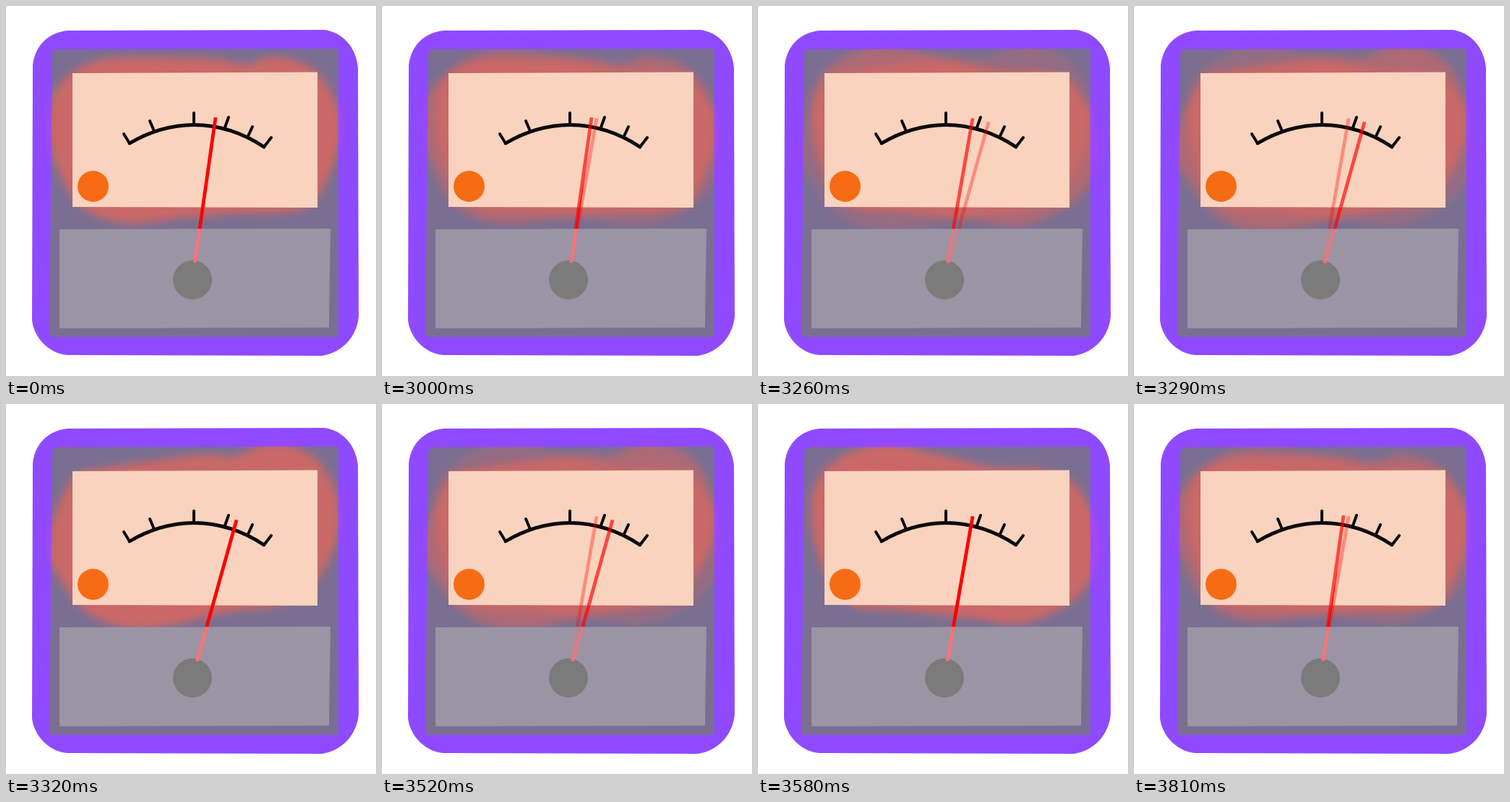
An HTML page with a canvas that plays this animation: 512 by 512 pixels, repeating every 3840 ms.

```html
<!DOCTYPE html>
<html lang="en">
<head>
<meta charset="utf-8">
<title>Meter</title>
<style>
  html, body { margin: 0; width: 100%; height: 100%; overflow: hidden; background: #fff; }
  canvas { display: block; width: 512px; height: 512px; }
</style>
</head>
<body>
<canvas id="stage" width="512" height="512"></canvas>
<script>
const SIZE = 512, LOOP = 3840, FADE_STEP = 30;
const PIVOT = { x: 258, y: 379 };

const CASE = new Path2D('M85 34L440 33C465 36 484 56 487 85L488 430C485 459 464 480 437 484L85 483C60 481 39 460 36 435L37 82C40 55 58 37 85 34Z');
const INNER = new Path2D('M72 60L455 59Q460 59 460 64L460 453Q460 458 455 458L66 458Q60 458 60 450L64 68Q64 60 72 60Z');
const PLATE = new Path2D('M92 93L431 91.5V279L92 278Z');
const PANEL = new Path2D('M74 309L449 308L447 445L74 446Z');
const SCALE = new Path2D('M171 190Q213 165 260 164.5Q312 165 357 195');
const TICKS = new Path2D('M163 177L171 190M199 159L205 173M260 148V164M308 154L303 168M341 167L335 180M367 182L357 195');

// Needle angle in degrees and the outline of the glow behind the plate
const low = {
  angle: 8.1,
  glow: [[56, 165], [74, 108], [130, 74], [220, 71], [290, 73], [330, 80], [375, 70], [430, 92],
         [464, 160], [447, 235], [410, 281], [310, 288], [240, 294], [170, 301], [112, 284], [75, 235]]
};
const mid = {
  angle: 9.9,
  glow: [[73, 150], [92, 90], [165, 55], [250, 70], [330, 88], [390, 90], [440, 112],
         [473, 190], [447, 262], [370, 303], [300, 297], [200, 286], [130, 279], [90, 230]]
};
const high = {
  angle: 15.6,
  glow: [[57, 195], [90, 106], [140, 88], [270, 70], [315, 72], [370, 54], [432, 78],
         [462, 150], [443, 225], [395, 273], [300, 290], [190, 312], [120, 294], [78, 248]]
};

// Closed Catmull-Rom curve
function smooth(points) {
  const path = new Path2D(), n = points.length;
  path.moveTo(...points[0]);
  points.forEach((p, i) => {
    const before = points[(i + n - 1) % n], next = points[(i + 1) % n], after = points[(i + 2) % n];
    path.bezierCurveTo(
      p[0] + (next[0] - before[0]) / 6, p[1] + (next[1] - before[1]) / 6,
      next[0] - (after[0] - p[0]) / 6, next[1] - (after[1] - p[1]) / 6,
      next[0], next[1]);
  });
  path.closePath();
  return path;
}

function disc(c, x, y, radius, color) {
  c.fillStyle = color;
  c.beginPath();
  c.arc(x, y, radius, 0, 2 * Math.PI);
  c.fill();
}

function drawGlow(c, clip, path, color) {
  c.save();
  c.clip(clip);
  c.filter = 'blur(6px)';
  c.fillStyle = color;
  c.fill(path);
  c.restore();
}

function drawNeedle(c, angle, top, bottom, color) {
  c.save();
  c.beginPath();
  c.rect(0, top, SIZE, bottom - top);
  c.clip();
  c.translate(PIVOT.x, PIVOT.y);
  c.rotate(angle * Math.PI / 180);
  c.fillStyle = color;
  c.fillRect(-2.4, -227, 4.8, 203);
  c.restore();
}

function render({ angle, glow }) {
  const canvas = document.createElement('canvas');
  canvas.width = canvas.height = SIZE;
  const c = canvas.getContext('2d');
  const fill = (path, color) => { c.fillStyle = color; c.fill(path); };
  const halo = smooth(glow);

  c.fillStyle = '#fff';
  c.fillRect(0, 0, SIZE, SIZE);
  fill(CASE, '#8f4aff');
  drawGlow(c, CASE, halo, 'rgba(200, 70, 235, .35)');
  fill(INNER, '#7a6f92');
  drawGlow(c, INNER, halo, '#c96867');
  fill(PLATE, '#f9d3be');
  fill(PANEL, '#9a94a4');

  c.strokeStyle = '#0c0a0c';
  c.lineCap = c.lineJoin = 'round';
  c.lineWidth = 4.8;
  c.stroke(SCALE);
  c.lineWidth = 4;
  c.stroke(TICKS);

  disc(c, 120.5, 249.5, 21.5, '#f76b15');
  disc(c, PIVOT.x, PIVOT.y, 27, '#7b7b7b');
  drawNeedle(c, angle, 0, 308.5, '#f00');
  drawNeedle(c, angle, 308.5, SIZE, '#fb7276');
  return canvas;
}

const [lowView, midView, highView] = [low, mid, high].map(render);
const fades = [
  { start: 3000, from: lowView, to: midView },
  { start: 3260, from: midView, to: highView },
  { start: 3520, from: highView, to: midView },
  { start: 3780, from: midView, to: lowView }
];
const ctx = document.getElementById('stage').getContext('2d');

function frame() {
  const t = performance.now() % LOOP;
  const fade = fades.findLast(f => t >= f.start) || { start: 0, from: lowView, to: lowView };
  const step = Math.floor((t - fade.start) / FADE_STEP) + 1;
  ctx.globalAlpha = 1;
  ctx.drawImage(fade.from, 0, 0);
  ctx.globalAlpha = Math.min(1, step / 3);
  ctx.drawImage(fade.to, 0, 0);
  requestAnimationFrame(frame);
}
frame();
</script>
</body>
</html>
```
